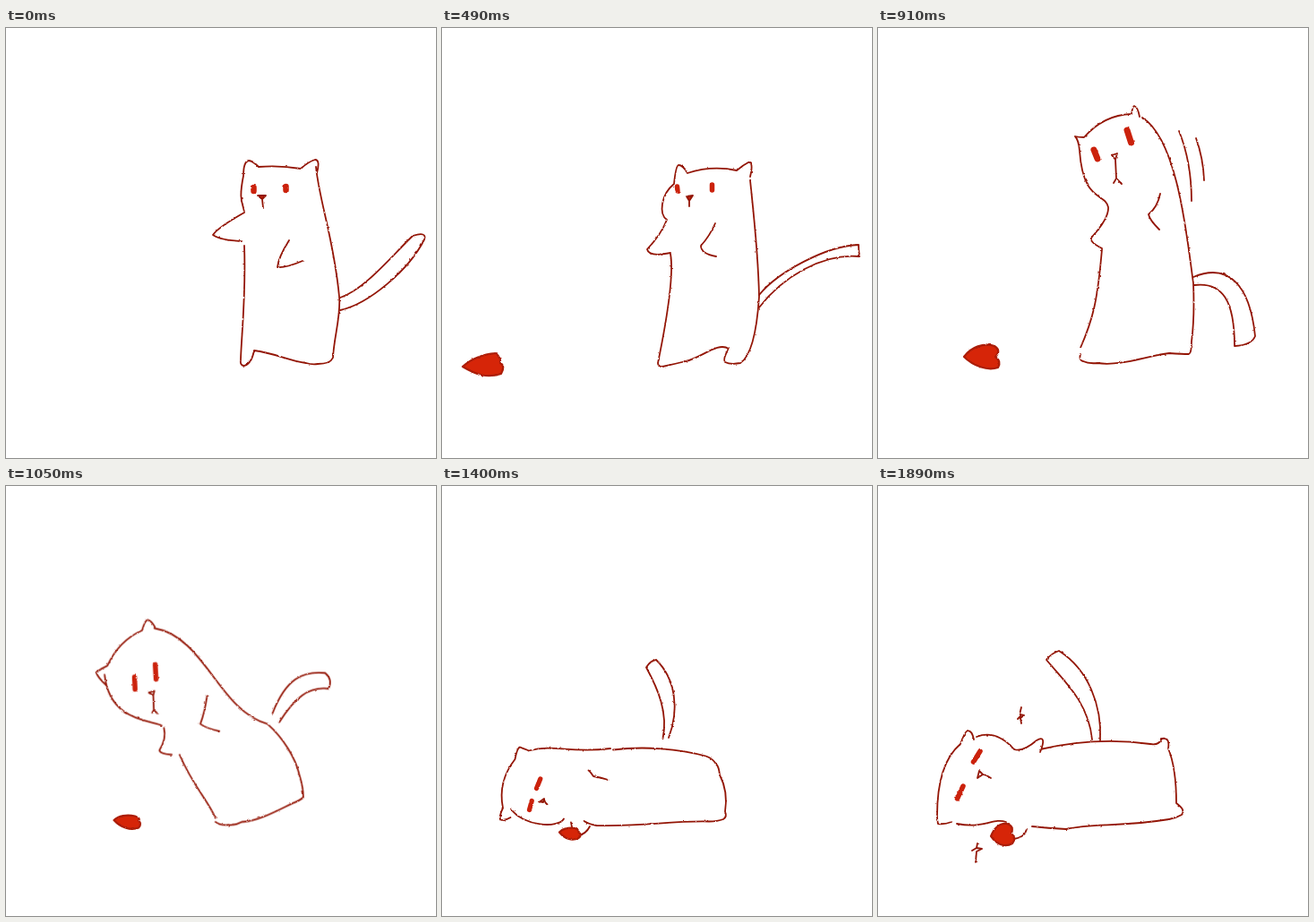
Animation of 480x480 px, one loop 1.96 s. Source, as an HTML page without scripts:

```html
<!DOCTYPE html>
<html lang="en">
<head>
<meta charset="utf-8">
<title>Cat and heart</title>
<style>
html, body { margin: 0; width: 100%; height: 100%; overflow: hidden; background: #fff; }
svg { display: block; width: 100vw; height: 100vh; }
path {
  fill: none; stroke: #931505; stroke-width: 1.8;
  stroke-linecap: round; stroke-linejoin: round;
  vector-effect: non-scaling-stroke;
}
.body, .tail, .eyes, .nose, .heart, .fall, .mark { animation: 1960ms infinite; }
.body { animation-name: body; }
.tail { animation-name: tail; }
.eyes { animation-name: eyes; stroke: #cb220c; }
.nose { animation-name: nose; fill: #cb220c; }
.heart { animation-name: heart; fill: #d62508; stroke: #ab1d08; stroke-width: 2.2; }
.fall { animation-name: fall; transform-origin: 300px 365px; }
.mark { opacity: 0; animation-timing-function: step-end; }
.sway { animation-name: sway; }
.thud { animation-name: thud; }
.glint { animation-name: glint; }
.glow { animation-name: glow; }

/* every pose: head, nape, back and feet, front, arm, cheek, far arm */
@keyframes body {
  0%, 100% { animation-timing-function: steps(3); d: path("M265 165 Q265 149 271 148 Q275 148 282 155 Q305 153 329 157 Q338 149 345 147 Q351 147 347 162 M346 155 C350 195 366 235 372 300 M372 300 C374 322 366 345 365 368 Q362 375 348 375 Q342 376 335 374 C315 371 300 363 277 360 Q274 375 266 377 Q261 377 262 370 M262 370 C263 340 268 300 266 243 Q266 243 266 243 M263 238 Q240 237 231 231 Q236 223 266 206 M266 206 C265 195 259 195 265 165 M316 237 Q304 256 303 267 Q312 268 331 260"); }
  10.714% { animation-timing-function: steps(4); d: path("M258 170 Q259 148 264 147 Q270 149 274 157 Q298 152 323 154 Q328 147 333 146 Q340 147 341 152 M341 152 C347 200 348 260 350 300 M350 300 C351 335 349 355 343 375 Q333 378 326 375 Q317 366 325 359 C305 361 285 361 265 362 Q259 378 246 376 Q238 377 240 372 M240 372 C246 330 256 295 255 248 Q255 248 255 248 M257 243 Q232 251 229 243 Q231 236 258 212 M258 212 C256 207 247 200 258 170 M307 224 Q287 248 287 254 Q290 257 309 256"); }
  25% { animation-timing-function: steps(6); d: path("M259 174 Q261 154 264 153 Q269 153 274 162 Q301 153 329 159 Q336 153 342 150 Q348 149 344 166 M344 170 C347 200 353 250 354 300 M354 300 C352 330 347 365 333 374 Q322 376 316 373 Q313 370 320 358 C308 350 290 368 272 372 Q260 375 246 378 Q241 378 241 374 M241 374 C248 340 260 280 255 252 Q255 252 255 252 M255 251 Q231 256 229 247 Q245 230 251 214 M251 214 C242 208 244 186 259 174 M305 218 Q299 232 289 243 Q289 252 306 255"); }
  46.428% { animation-timing-function: steps(4); d: path("M225 137 Q224 125 220 121 Q224 122 230 122 Q252 97 283 96 Q284 88 286 87 Q290 88 292 99 M295 100 C335 125 345 235 352 285 M352 285 C353 310 352 335 350 350 Q350 363 347 364 Q340 364 325 363 C300 366 270 378 245 374 Q235 375 229 372 Q224 371 226 364 M226 357 C240 325 245 305 250 247 Q250 247 250 247 M250 246 Q234 238 239 233 Q258 212 257 200 M257 200 C253 183 229 195 225 137 M315 185 Q312 200 302 208 Q303 214 314 225"); }
  60.714% { animation-timing-function: steps(6); d: path("M73 364 Q60 363 61 358 Q66 350 71 345 Q70 325 80 308 Q84 298 87 298 Q90 299 94 299 M90 300 C140 290 155 312 235 286 M235 286 C262 286 285 296 294 312 Q301 322 304 338 Q306 343 306 350 C304 360 300 367 296 372 Q293 378 288 379 Q280 382 268 382 M268 382 C240 381 210 379 180 379 Q180 379 180 379 M166 380 Q160 386 155 385 Q149 385 145 378 M141 374 C130 381 76 374 71 346 M164 336 Q163 350 165 363 Q175 365 187 359"); }
  82.142% { animation-timing-function: steps(4); d: path("M80 376 Q80 385 69 387 Q62 385 65 374 Q54 335 83 302 Q84 286 87 285 Q91 287 98 291 M103 291 C115 285 127 286 141 300 M147 303 C190 294 245 291 295 291 Q303 286 309 284 Q312 284 314 295 C330 312 336 335 336 355 Q344 360 340 365 Q335 367 328 367 M328 367 C265 366 245 382 165 379 Q148 376 137 369 M164 380 Q161 392 147 396 Q141 384 143 373 M131 369 C130 384 105 386 83 375 M163 299 Q166 285 173 285 Q180 286 184 297"); }
  96.428% { animation-timing-function: steps(1); d: path("M82 375 Q74 378 67 377 Q66 374 66 368 Q66 310 92 288 Q97 274 100 273 Q105 273 107 283 M110 280 C128 273 142 283 152 294 M181 294 C220 285 260 282 304 288 Q313 290 317 282 Q326 280 324 293 C331 310 333 335 333 354 Q344 362 339 367 Q332 371 325 372 M325 372 C270 381 240 376 210 383 Q190 382 172 380 M166 383 Q164 392 152 394 Q146 388 146 377 M143 375 C128 370 120 383 88 377 M152 294 Q162 297 177 284 Q189 277 181 297"); }
}
@keyframes tail {
  0%, 100% { animation-timing-function: steps(3); d: path("M373 301 C400 292 430 255 454 232 Q470 227 467 236 C450 270 405 308 373 315"); }
  10.714% { animation-timing-function: steps(4); d: path("M351 302 C390 292 425 258 447 234 Q463 232 461 240 C445 268 405 307 351 311"); }
  25% { animation-timing-function: steps(6); d: path("M354 298 C375 272 430 243 465 242 Q465 248 466 255 C425 251 380 278 354 312"); }
  46.428% { animation-timing-function: steps(2); d: path("M352 278 C390 262 415 285 421 344 Q417 354 398 355 C398 305 385 283 353 287"); }
  53.571% { animation-timing-function: steps(2); d: path("M298 276 C310 245 325 238 345 240 Q352 246 348 254 C330 252 318 262 304 284"); }
  60.714% { animation-timing-function: steps(6); d: path("M247 274 C248 240 235 218 213 197 Q220 187 226 185 C260 206 265 245 248 276"); }
  82.142% { animation-timing-function: steps(4); d: path("M246 290 C257 265 247 235 243 208 Q245 203 252 203 C262 225 265 255 258 286"); }
  96.428% { animation-timing-function: steps(1); d: path("M239 283 C235 240 205 215 188 194 Q193 187 202 184 C235 205 250 245 248 284"); }
}
@keyframes eyes {
  0%, 100% { animation-timing-function: steps(3); stroke-width: 6.5; d: path("M276.5 178 L276.5 182 M312.5 177 L312.5 181"); }
  10.714% { animation-timing-function: steps(4); stroke-width: 5.5; d: path("M267 178 L267.5 182 M304.5 176 L304.5 181"); }
  25% { animation-timing-function: steps(6); stroke-width: 5.5; d: path("M262.5 177 L263 182 M301.5 175 L301.5 181"); }
  46.428% { animation-timing-function: steps(4); stroke-width: 7; d: path("M241 136 L245 146 M278 114 L282.5 128"); }
  60.714% { animation-timing-function: steps(6); stroke-width: 4; d: path("M108.5 351 L105.5 363 M108.5 351 L105.5 363"); }
  82.142% { animation-timing-function: steps(4); stroke-width: 6.5; d: path("M92 352 L89.5 360 M111 303 L105.5 312"); }
  96.428% { animation-timing-function: steps(1); stroke-width: 5.5; d: path("M95 335 L88.5 349 M114 296 L106.5 308"); }
}
@keyframes nose {
  0%, 100% { animation-timing-function: steps(3); fill-opacity: 1; d: path("M281 187 L290 187 L286 191 Z M286 191 L287 201 M287 201 L287 201 L287 201"); }
  10.714% { animation-timing-function: steps(4); fill-opacity: 1; d: path("M276 188 L285 188 L280 193 Z M280 193 L281 198 M281 198 L281 198 L281 198"); }
  25% { animation-timing-function: steps(6); fill-opacity: 1; d: path("M273 188 L280 187 L276 193 Z M276 193 L276 199 M276 199 L276 199 L276 199"); }
  46.428% { animation-timing-function: steps(4); fill-opacity: 0; d: path("M261 142 L267 140 L265 147 Z M265 147 L266 168 M263 173 L266 168 L272 174"); }
  60.714% { animation-timing-function: steps(6); fill-opacity: 0; d: path("M114 373 L118 372 L118 373 Z M118 373 L118 378 M118 378 L118 378 L118 378"); }
  82.142% { animation-timing-function: steps(4); fill-opacity: 0; d: path("M104 332 L110 326 L108 333 Z M110 327 L113 329 M113 329 L113 329 L117 333"); }
  96.428% { animation-timing-function: steps(1); fill-opacity: 0; d: path("M111 326 L113 318 L117 322 Z M117 322 L121 323 M121 323 L121 323 L126 326"); }
}
@keyframes heart {
  0%, 10.714%, 100% { animation-timing-function: steps(4); d: path("M-47 378 C-36 368 -24 364 -10 363 Q-4 368 -5 374 Q1 377 -4 386 C-20 391 -32 387 -47 378"); }
  25% { animation-timing-function: steps(6); d: path("M23 378 C34 368 46 364 60 363 Q66 368 65 374 Q71 377 66 386 C50 391 38 387 23 378"); }
  46.428% { animation-timing-function: steps(4); d: path("M96 367 C104 356 118 351 130 355 Q138 360 131 367 Q138 372 134 379 C122 383 106 377 96 367"); }
  60.714% { animation-timing-function: steps(6); d: path("M145 379 C147 380 152 382 158 382 Q163 382 165 380 Q166 382 162 384 C157 387 150 386 145 379"); }
  82.142% { animation-timing-function: steps(4); d: path("M117 394 C121 386 130 379 139 382 Q144 387 140 393 Q148 396 143 402 C134 406 125 403 117 394"); }
  96.428% { animation-timing-function: steps(1); d: path("M126 391 C129 383 135 376 144 377 Q152 379 149 388 Q155 393 150 399 C142 404 132 400 126 391"); }
}
/* keeps the body long while it tips over */
@keyframes fall {
  0%, 46.428% { animation-timing-function: steps(2); transform: scale(1); }
  53.571% { animation-timing-function: steps(2); transform: scale(1.25); }
  60.714%, 100% { transform: scale(1); }
}
@keyframes sway { 0%, 53.571%, 100% { opacity: 0; } 39.285% { opacity: 1; } }
@keyframes thud { 0%, 67.857%, 100% { opacity: 0; } 57.142% { opacity: 1; } }
@keyframes glint { 0%, 89.285%, 100% { opacity: 0; } 75% { opacity: 1; } }
@keyframes glow { 0%, 100% { opacity: 0; } 89.285% { opacity: 1; } }
</style>
</head>
<body>
<svg viewBox="0 0 480 480">
  <filter id="rough" filterUnits="userSpaceOnUse" x="0" y="0" width="480" height="480" color-interpolation-filters="sRGB">
    <feTurbulence type="fractalNoise" baseFrequency=".25" numOctaves="2" seed="4"/>
    <feDisplacementMap in="SourceGraphic" scale="2.2" xChannelSelector="R" yChannelSelector="G"/>
  </filter>
  <g filter="url(#rough)">
    <g class="fall">
      <path class="tail"/>
      <path class="body"/>
      <path class="eyes"/>
      <path class="nose"/>
    </g>
    <path class="heart"/>
    <g class="mark sway"><path d="M336 115 Q350 150 350 193 M355 123 Q363 145 364 170"/></g>
    <g class="mark thud"><path d="M125 260 L128 272 M138 258 L135 279"/></g>
    <g class="mark glint"><path d="M163 243 Q161 255 169 258 Q161 260 161 270 M103 392 Q104 404 114 405 Q103 409 104 425 M103 392 Q104 402 99 406"/></g>
    <g class="mark glow"><path d="M160 247 L158 255 L163 256 L159 259 L160 265 M156 260 L159 257 M111 399 L110 404 L116 405 L110 408 L109 420 M105 407 L110 404"/></g>
  </g>
</svg>
</body>
</html>
```
